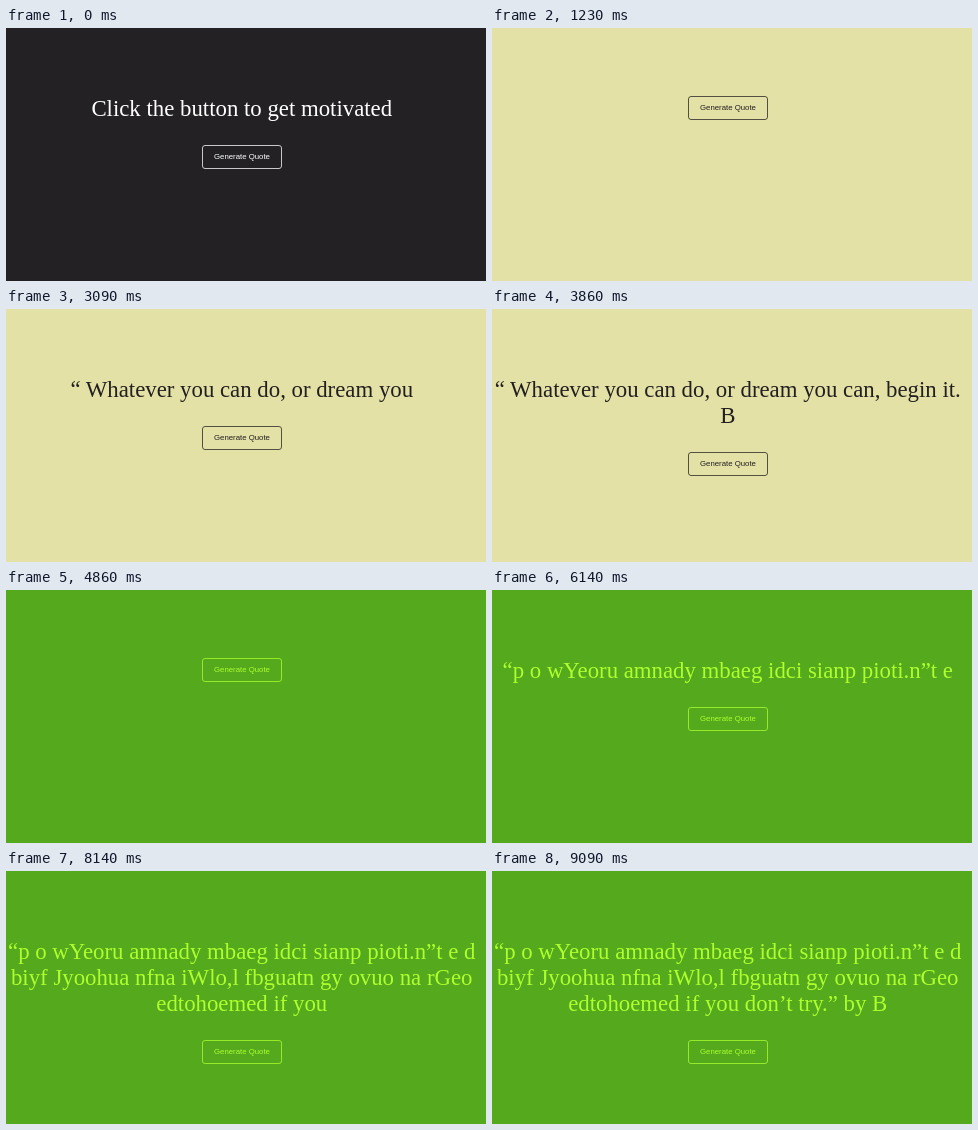
These frames come from a looping animation (480 px wide and 253 px high, 9130 ms). An HTML page:

```html
<!DOCTYPE html>
<html lang="en">
<head>
<meta charset="utf-8">
<title>Quote generator</title>
<style>
  html, body { margin: 0; width: 100%; height: 100%; overflow: hidden; }
  main {
    position: absolute;
    inset: 0;
    overflow: hidden;
    background: var(--back);
    color: var(--ink);
  }
  p {
    width: 474px;
    margin: 68px 0 0 -1.25px;
    font: 22.8px/26px "Liberation Serif", Times, serif;
    text-align: center;
  }
  .button {
    box-sizing: border-box;
    width: 80px;
    height: 24px;
    margin: 23px 0 0 196px;
    border: 1px solid color-mix(in srgb, var(--ink) 75%, var(--back));
    border-radius: 3px;
    font: 7.8px/22px "Liberation Sans", Arial, sans-serif;
    text-align: center;
    white-space: nowrap;
  }
</style>
</head>
<body>
<main>
  <p></p>
  <div class="button">Generate Quote</div>
</main>
<script>
const LOOP = 9130, TICK = 50.3;
const FIRST_CLICK = 1190, SECOND_CLICK = 4860;
const SHARED_TICKS = 55;

const intro = "Click the button to get motivated";
const first = "“  Whatever you can do, or dream you can, begin it. Boldness has genius, ";
// After the second click both timers type into the same paragraph.
const second = "“p o wYeoru  amnady  mbaeg idci sianp pioti.n”t e d  biyf  Jyoohua nfna iWlo,l " +
  "fbguatn gy ovuo na rGeo edtohoemed if you don’t try.”   by B";

const stage = document.querySelector("main");
const quote = document.querySelector("p");

function show(text, back, ink) {
  if (quote.textContent !== text) quote.textContent = text;
  stage.style.setProperty("--back", back);
  stage.style.setProperty("--ink", ink);
}

function draw() {
  const t = performance.now() % LOOP;
  const ticksSince = click => Math.floor((t - click) / TICK);

  if (t < FIRST_CLICK) {
    show(intro, "#232124", "#fff");
  } else if (t < SECOND_CLICK) {
    show(first.slice(0, ticksSince(FIRST_CLICK)), "#e3e1a5", "#231f20");
  } else {
    const n = ticksSince(SECOND_CLICK);
    show(second.slice(0, n + Math.min(n, SHARED_TICKS)), "#54a91c", "#adff2f");
  }
  requestAnimationFrame(draw);
}
draw();
</script>
</body>
</html>
```
